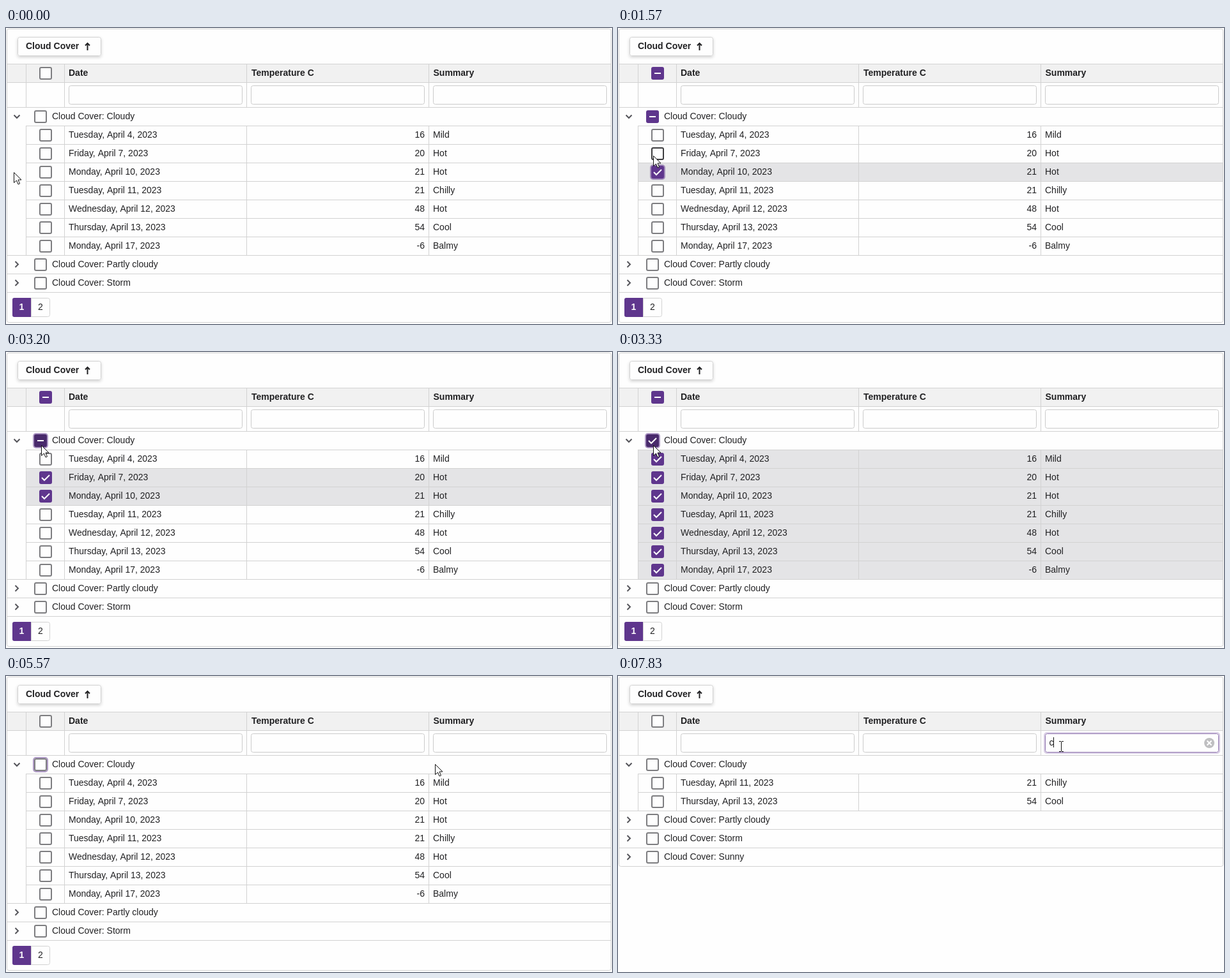
These frames come from a looping animation (948x464 px, 8000 ms). An HTML page with a canvas:

```html
<!DOCTYPE html>
<html lang="en">
<head>
<meta charset="utf-8">
<title>Grid selection and filter</title>
<style>
html, body { margin: 0; width: 100%; height: 100%; overflow: hidden; background: #fefefe; }
canvas { display: block; }
</style>
</head>
<body>
<canvas id="stage" width="948" height="464"></canvas>
<script>
const ctx = document.getElementById('stage').getContext('2d');
const LOOP = 8000;
const PAGE = '#fefefe', LINE = '#d2d2d2', INK = '#212123', PURPLE = '#5f368d', DARK = '#492a6c';
const FONT = '14px "Liberation Sans", Arial, sans-serif';
const COLS = [31, 91, 376, 661];
const ROW = 29;

const DATA = [
  ['Tuesday, April 4, 2023', '16', 'Mild'],
  ['Friday, April 7, 2023', '20', 'Hot'],
  ['Monday, April 10, 2023', '21', 'Hot'],
  ['Tuesday, April 11, 2023', '21', 'Chilly'],
  ['Wednesday, April 12, 2023', '48', 'Hot'],
  ['Thursday, April 13, 2023', '54', 'Cool'],
  ['Monday, April 17, 2023', '-6', 'Balmy']
];

// Pointer path: time, x, y
const PATH = [
  [0, 12, 226], [470, 12, 226], [930, 57, 224], [1220, 57, 224], [1570, 55, 200],
  [2500, 55, 200], [2930, 55, 146], [4670, 55, 146], [4900, 150, 166], [5130, 370, 186],
  [5330, 555, 181], [5500, 648, 151], [5570, 671, 138], [5770, 693, 110], [LOOP, 693, 110]
];

// Cubic Hermite through the path, at rest wherever the pointer holds still
function pointerAt(t) {
  let i = 0;
  while (i < PATH.length - 2 && t >= PATH[i + 1][0]) i++;
  const a = PATH[i], b = PATH[i + 1], span = b[0] - a[0], u = (t - a[0]) / span;
  const same = (p, q) => p[1] === q[1] && p[2] === q[2];
  const slope = (k, axis) => {
    const p = PATH[k - 1], c = PATH[k], n = PATH[k + 1];
    if (!p || !n || same(p, c) || same(c, n)) return 0;
    return (n[axis] - p[axis]) / (n[0] - p[0]);
  };
  return [1, 2].map(axis => {
    const u2 = u * u, u3 = u2 * u;
    return Math.round((2 * u3 - 3 * u2 + 1) * a[axis] + (u3 - 2 * u2 + u) * span * slope(i, axis)
      + (3 * u2 - 2 * u3) * b[axis] + (u3 - u2) * span * slope(i + 1, axis));
  });
}

function rect(x, y, w, h, color) {
  ctx.fillStyle = color;
  ctx.fillRect(x, y, w, h);
}

function rounded(x, y, w, h, r, color) {
  ctx.fillStyle = color;
  ctx.beginPath();
  ctx.roundRect(x, y, w, h, r);
  ctx.fill();
}

function frame(x, y, w, h, r, color, width = 1) {
  ctx.strokeStyle = color;
  ctx.lineWidth = width;
  ctx.beginPath();
  ctx.roundRect(x + width / 2, y + width / 2, w - width, h - width, r);
  ctx.stroke();
}

function polyline(points, color, width) {
  ctx.strokeStyle = color;
  ctx.lineWidth = width;
  ctx.beginPath();
  points.forEach(([x, y]) => ctx.lineTo(x, y));
  ctx.stroke();
}

function text(s, x, y, { bold = false, align = 'left', color = INK } = {}) {
  ctx.font = (bold ? 'bold ' : '') + FONT;
  ctx.textAlign = align;
  ctx.fillStyle = color;
  ctx.fillText(s, x, y);
}

const hLine = (y, x = 2) => rect(x, y, 946 - x, 1, LINE);
const vLines = (y, h) => COLS.forEach(x => rect(x, y, 1, h, LINE));

// mark: '' empty, '-' partial, 'v' checked
function checkbox(x, y, mark, focused, [px, py]) {
  const hover = px >= x && px < x + 20 && py >= y && py < y + 20;
  if (focused) rounded(x - 2, y - 2, 24, 24, 5, 'rgba(95,54,141,0.5)');
  if (!mark) {
    rounded(x, y, 20, 20, 3, PAGE);
    frame(x, y, 20, 20, 2, hover ? '#3c3c3e' : '#7d7d80', 2);
    return;
  }
  rounded(x, y, 20, 20, 3, hover ? DARK : PURPLE);
  if (mark === '-') rect(x + 5, y + 9, 10, 2, '#fff');
  else polyline([[x + 4, y + 10], [x + 8, y + 14], [x + 16, y + 6]], '#fff', 2);
}

function chevron(y, open) {
  const pts = open ? [[12.5, y - 2], [17, y + 2.5], [21.5, y - 2]]
                   : [[14.5, y - 4.5], [19, y], [14.5, y + 4.5]];
  polyline(pts, '#55555b', 2);
}

function header(mark, pointer) {
  ctx.save();
  ctx.shadowColor = 'rgba(0,0,0,0.18)';
  ctx.shadowBlur = 5;
  ctx.shadowOffsetY = 2;
  rounded(18, 14, 131, 30, 3, PAGE);
  ctx.restore();
  frame(18, 14, 131, 30, 3, LINE);
  text('Cloud Cover', 31, 33, { bold: true });
  polyline([[127.5, 35], [127.5, 24]], INK, 2);
  polyline([[124, 27.5], [127.5, 24], [131, 27.5]], INK, 2);

  rect(2, 57, 944, 28, '#f1f1f1');
  hLine(56);
  hLine(85);
  hLine(124);
  vLines(56, 68);
  text('Date', 98, 75, { bold: true });
  text('Temperature C', 384, 75, { bold: true });
  text('Summary', 668.5, 75, { bold: true });
  checkbox(52, 61, mark, false, pointer);
}

function filters(s) {
  [98, 383, 668].forEach((x, i) => {
    const active = i === 2 && s.editing;
    if (active) rounded(666, 88, 276, 34, 5, '#d9cee5');
    rounded(x, 90, 272, 30, 3, PAGE);
    frame(x, 90, 272, 30, 3, active ? '#8f75ae' : '#cbcbcb');
  });
  if (s.typed) text('c', 674.5, 109);
  if (s.caret) rect(s.typed ? 681 : 675, s.typed ? 96 : 97, 1, 16, '#111');
  if (s.filtered) {
    ctx.fillStyle = '#bfbfc1';
    ctx.beginPath();
    ctx.arc(925, 105, 8, 0, 7);
    ctx.fill();
    polyline([[921.5, 101.5], [928.5, 108.5]], '#fff', 2);
    polyline([[928.5, 101.5], [921.5, 108.5]], '#fff', 2);
  }
}

function group(name, y, open, mark, focused, pointer) {
  hLine(y + ROW, open ? 31 : 2);
  chevron(y + 14.5, open);
  checkbox(44, y + 5, mark, focused, pointer);
  text('Cloud Cover: ' + name, 72, y + 19);
}

function dataRow(row, y, selected, focused, last, pointer) {
  if (selected) rect(32, y + 1, 914, ROW - 1, '#e4e4e6');
  hLine(y + ROW, last ? 2 : 31);
  vLines(y, ROW);
  checkbox(52, y + 5, selected ? 'v' : '', focused, pointer);
  text(row[0], 98, y + 19);
  text(row[1], 655, y + 19, { align: 'right' });
  text(row[2], 668, y + 19);
}

function pager() {
  rounded(10, 423, 59, 30, 3, PAGE);
  frame(10, 423, 59, 30, 3, LINE);
  rounded(10, 423, 29, 30, [3, 0, 0, 3], PURPLE);
  rect(39, 423, 1, 30, LINE);
  text('1', 24.5, 442, { bold: true, align: 'center', color: '#fff' });
  text('2', 54, 442, { align: 'center' });
}

function arrow(x, y) {
  ctx.beginPath();
  [[0, 0], [0, 16], [4, 12.5], [6.5, 18.5], [9, 17.5], [6.5, 11.5], [11.5, 11.5]]
    .forEach(([dx, dy]) => ctx.lineTo(x + 0.5 + dx, y + 0.5 + dy));
  ctx.closePath();
  ctx.fillStyle = '#fff';
  ctx.fill();
  ctx.strokeStyle = '#111';
  ctx.lineWidth = 1;
  ctx.stroke();
}

function beam(x, y) {
  rect(x, y - 7, 1, 15, '#111');
  [y - 8, y + 8].forEach(v => {
    rect(x - 3, v, 3, 1, '#111');
    rect(x + 1, v, 3, 1, '#111');
  });
}

function stateAt(t) {
  const all = t >= 3330 && t < 4500;
  const some = t >= 1230 && t < 3330;
  return {
    all, some,
    selected: i => all || (some && (i === 2 || (i === 1 && t >= 2100))),
    focus: t < 1100 ? '' : t < 1970 ? 2 : t < 3200 ? 1 : t < 5900 ? 'group' : '',
    editing: t >= 5900,
    typed: t >= 6700,
    filtered: t >= 7300,
    caret: (t >= 5900 && t < 6500) || (t >= 6700 && t < 7270) || t >= 7830
  };
}

function draw(t) {
  const s = stateAt(t), p = pointerAt(t);
  rect(0, 0, 948, 464, PAGE);
  header(s.all || s.some ? '-' : '', p);
  filters(s);
  group('Cloudy', 124, true, s.all ? 'v' : s.some ? '-' : '', s.focus === 'group', p);

  const rows = s.filtered ? DATA.filter(r => r[2][0] === 'C') : DATA;
  rows.forEach((r, i) =>
    dataRow(r, 153 + i * ROW, s.selected(i), s.focus === i, i === rows.length - 1, p));

  let y = 153 + rows.length * ROW;
  const closed = ['Partly cloudy', 'Storm'].concat(s.filtered ? 'Sunny' : []);
  closed.forEach(name => {
    group(name, y, false, '', false, p);
    y += ROW;
  });
  if (s.filtered) rect(2, y, 944, 1, PAGE);
  else pager();
  frame(1, 1, 946, s.filtered ? y : 461, 3, LINE);

  const overInput = p[0] >= 668 && p[0] < 940 && p[1] >= 90 && p[1] < 120;
  (overInput ? beam : arrow)(...p);
}

const start = performance.now();
function tick() {
  draw((performance.now() - start) % LOOP);
  requestAnimationFrame(tick);
}
tick();
</script>
</body>
</html>
```
